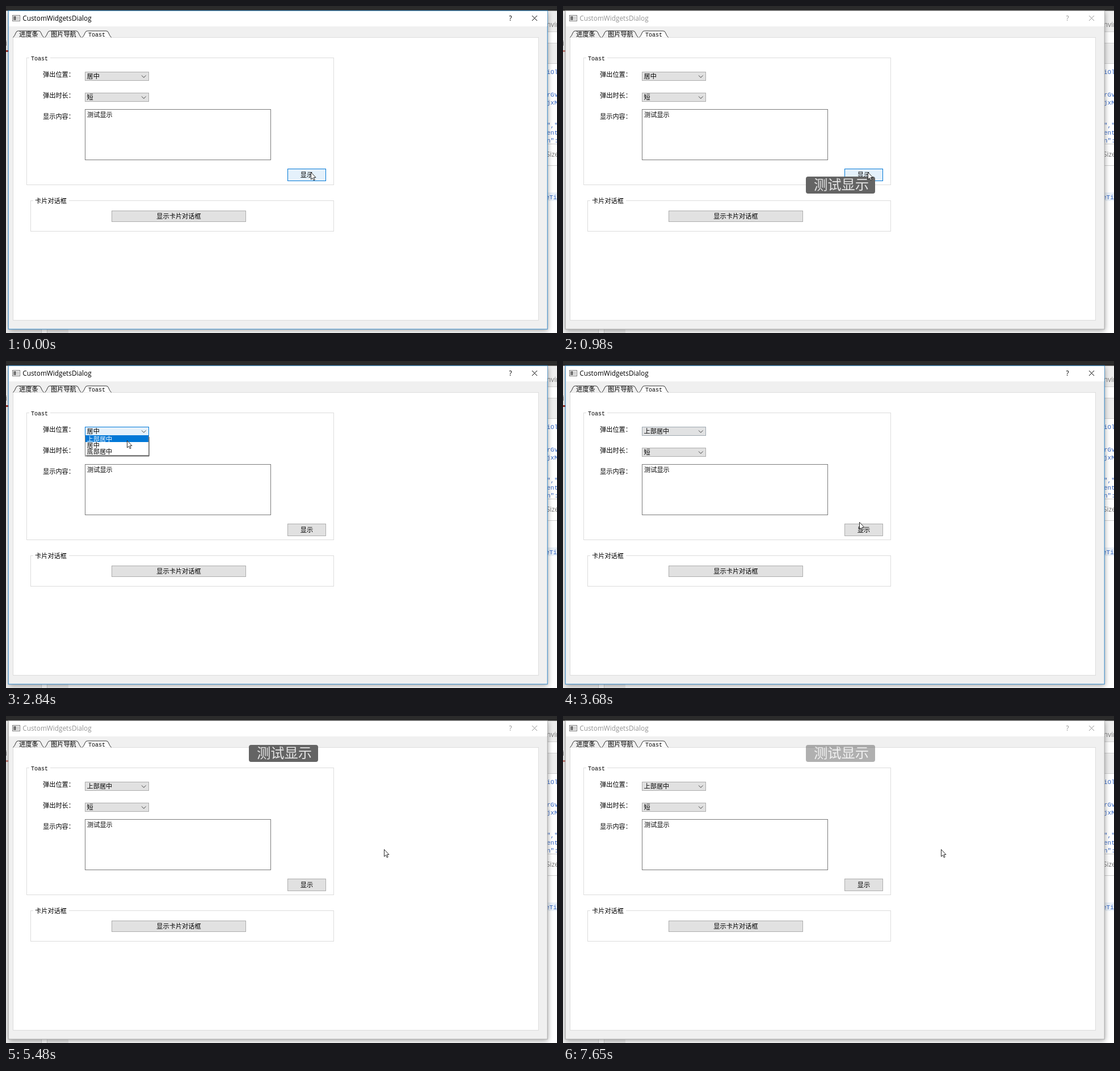
An HTML page that plays this animation: 971 by 577 pixels, repeating every 7730 ms.

```html
<!DOCTYPE html>
<html lang="zh-CN">
<head>
<meta charset="utf-8">
<title>CustomWidgetsDialog</title>
<style>
  html, body { margin: 0; width: 100%; height: 100%; overflow: hidden; background: #fff; }
  svg { display: block; width: 971px; height: 577px; }
  text { font: 300 11.2px "Noto Sans CJK SC", "Noto Sans CJK", sans-serif; white-space: pre; }
  .mono { font: 10px "Liberation Mono", monospace; }
  .code { font: 11px "Liberation Mono", monospace; fill: #3567c4; }
  .ui { font: 11.8px "Open Sans", sans-serif; }
  .soft { fill: #777; }
  .big { font-size: 24.3px; fill: #e4e4e4; }
  .mid { text-anchor: middle; }
  .ctl { fill: #e1e1e1; stroke: #adadad; }
  .hot { fill: #e5f1fb; stroke: #0078d7; }
  .line { fill: none; stroke: #dcdcdc; }
  .pane { fill: #fff; stroke: #dcdcdc; }
  .edit { fill: #fff; stroke: #7a7a7a; }
  .tab { fill: #f0f0f0; stroke: #333; }
  .tab.on { fill: #fff; }
  .chev { fill: none; stroke: #444; }
  .dark { fill: #2b2b2b; }
  .paper { fill: #fff; }
  .grey { fill: #eee; }
  .rule { fill: #d0d0d0; }
  .tint { fill: #eaf1f9; }
  .shade { fill: #000; opacity: .45; }
  .glow { fill: #000; opacity: .36; filter: blur(5px); }
  .pick { fill: #0078d7; }
  .bubble { fill: #646464; }
</style>
</head>
<body>
<svg id="stage" viewBox="0 0 971 577"></svg>
<script>
const LOOP = 7730;
const CLICK = 290, BACK = 2230, OPEN = 2540, HOVER = 2840, PICK = 3220, CLICK2 = 4000;

// static drawing
const box = (cls, x, y, w, h, extra = '') =>
  `<rect class="${cls}" x="${x}" y="${y}" width="${w}" height="${h}" ${extra}/>`;
const frame = (cls, x, y, w, h, extra) => box(cls, x + 0.5, y + 0.5, w - 1, h - 1, extra);
const label = (x, y, s, cls = '', extra = '') => `<text class="${cls}" x="${x}" y="${y}" ${extra}>${s}</text>`;
const group = (id, ...parts) => `<g id="${id}">${parts.join('')}</g>`;
const tab = (x, w, s, on = '') =>
  `<path class="tab ${on}" d="M${x} 55.5q3-3 5-8.500q1-3 4-3h${w - 18}q3 0 4 3q2 5.500 5 8.500"/>` +
  label(x + 10.5, on ? 53.5 : 54, s, on && 'mono');
const combo = (y, s, id) =>
  frame('ctl', 139, y, 113, 16) + frame('hot', 139, y, 113, 16, `id="${id}Hot" opacity="0"`) +
  label(142.5, y + 12.2, s, '', `id="${id}"`) + `<path class="chev" d="M239 ${y + 6.5}l3.800 3.800 3.800-3.800"/>`;
const fieldset = (x, y, h, w, title, cls) =>
  frame('line', x, y, 578 - x, h) + box('paper', x + 5, y - 1, w, 4) + label(x + 8, y + 4.5, title, cls);

const page = [
  box('grey', 0, 9, 5, 568), label(-1, 70, 'i', 'ui soft'), box('', 0, 78, 5, 3, 'id="mark"'),
  box('grey', 0, 570, 62, 7), box('rule', 62, 570, 1, 7), box('rule', 72, 570, 1, 7), box('grey', 73, 570, 37, 7),
  box('grey', 950, 9, 21, 37), box('grey', 950, 65, 21, 37), box('tint', 950, 329, 21, 15),
  ...[45, 65, 101, 243, 281].map(y => box('rule', 950, y, 21, 1)),
  label(953, 37, 'nvir', 'ui soft', 'font-weight="600"'), label(952, 266, 'Size', 'ui soft'),
  ...['iOl', '', '', 'rGv', 'jxM', '', '', '","', 'ent', 'n":'].map((s, i) => label(953, 120 + 13.4 * i, s, 'code')),
  label(951, 341, 'eTim', 'code')
];
const shell = [
  box('glow', 5, 11, 950, 562), box('dark', 0, 0, 971, 8.5),
  box('', 4.2, 8.2, 950, 562, 'id="frame" fill="#f0f0f0"'), box('paper', 5, 9, 949, 27),
  frame('edit', 11, 16, 14, 11), box('soft', 13, 18, 5, 7), box('rule', 19, 18, 4, 7),
  group('caption', label(29.3, 26, 'CustomWidgetsDialog', 'ui'), label(889, 26, '?', 'ui mid'),
    '<path d="M927 17l9 9m0-9l-9 9" stroke="#000"/>'),
  frame('pane', 12, 55, 927, 500),
  tab(12.5, 54, '进度条'), tab(68.5, 64, '图片导航'), tab(134.5, 51, 'Toast', 'on')
];
const form = [
  fieldset(36, 91, 225, 37, 'Toast', 'mono'),
  ...['弹出位置：', '弹出时长：', '显示内容：'].map((s, i) => label(65, 125 + 37 * i, s)),
  combo(116, '居中', 'place'), combo(153, '短', 'span'),
  frame('edit', 139, 182, 328, 90), label(143, 195.7, '测试显示'),
  frame('ctl', 496, 287, 68, 22), frame('hot', 496, 287, 68, 22, 'id="buttonHot"'), label(530, 302, '显示', 'mid'),
  fieldset(43, 343, 55, 63, '卡片对话框', ''),
  frame('ctl', 186, 361, 237, 20), label(304.5, 375, '显示卡片对话框', 'mid')
];
const overlays = [
  group('list', box('shade', 142, 134, 111, 34), frame('edit', 139, 132, 113, 35),
    box('pick', 140, 132, 111, 11, 'id="pick"'),
    ...['上部居中', '居中', '底部居中'].map((s, i) => label(142.5, 141.7 + 11 * i, s))),
  group('toast', box('bubble', 428, 0, 122, 30, 'rx="4"'), label(490.5, 23, '测试显示', 'big mid')),
  '<path id="cursor" d="M.5 .5V13L3.400 10.400L5.300 14.700L7.200 13.900L5.300 9.600H9Z" fill="#fff" stroke="#111" stroke-width=".9"/>'
];
const el = id => document.getElementById(id);
el('stage').innerHTML = [page, shell, form, overlays].flat().join('');

// motion
const ramp = (t, a, b) => Math.min(1, Math.max(0, (t - a) / (b - a)));
const ease = k => k * k * (3 - 2 * k);
const set = (id, name, value) => el(id).setAttribute(name, value);

const STEPS = [
  { from: 1990, to: 2450, x: 213, y: 120 },
  { from: 2600, to: HOVER, x: 213, y: 140 },
  { from: PICK, to: 3680, x: 522, y: 284 },
  { from: 3760, to: 3840, x: 533, y: 292 },
  { from: 4880, to: 5020, x: 544, y: 290 },
  { from: 5170, to: 5480, x: 666, y: 235 }
];

function pointer(t) {
  let x = 537, y = 293;
  for (const s of STEPS) {
    const k = ease(ramp(t, s.from, s.to));
    x += (s.x - x) * k;
    y += (s.y - y) * k;
  }
  return `translate(${Math.round(x)} ${Math.round(y)})`;
}

function toastOpacity(t) {
  const first = ramp(t, 320, 980) - ramp(t, 1600, BACK);
  const second = 0.62 * ramp(t, CLICK2, 4390) + 0.38 * ramp(t, 4850, 5020);
  return first + second - 0.5 * ramp(t, 7350, 7650);
}

function draw(t) {
  const away = (t >= CLICK && t < BACK) || t >= CLICK2;
  const picked = t >= PICK;
  const row = t >= HOVER ? 0 : 1;
  set('cursor', 'transform', pointer(t));
  set('placeHot', 'opacity', ramp(t, 2300, 2450) - ramp(t, PICK, 3720));
  set('buttonHot', 'opacity', 1 - ramp(t, 2060, 2300) + ramp(t, 3700, 3920) - ramp(t, 5200, 5450));
  set('toast', 'opacity', toastOpacity(t));
  set('toast', 'transform', `translate(0 ${picked ? 51 : 301})`);
  set('list', 'visibility', t >= OPEN && !picked ? 'visible' : 'hidden');
  set('pick', 'y', 132 + 11 * row);
  el('list').querySelectorAll('text').forEach((n, i) => n.style.fill = i === row ? '#fff' : '#000');
  el('place').textContent = picked ? '上部居中' : '居中';
  set('frame', 'stroke', away ? '#a8a8a8' : '#2f87c8');
  set('caption', 'opacity', away ? 0.42 : 1);
  set('mark', 'fill', away ? '#c98078' : '#a02c20');
}

const start = performance.now();
(function tick() {
  draw((performance.now() - start) % LOOP);
  requestAnimationFrame(tick);
})();
</script>
</body>
</html>
```
